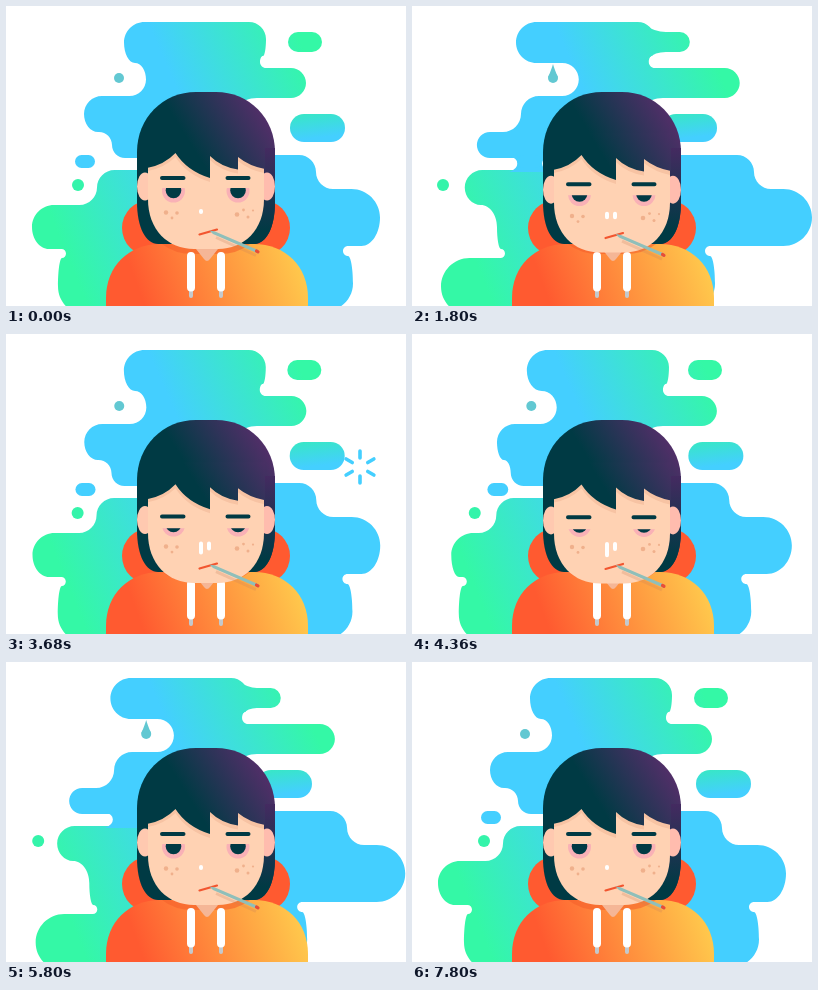
Recreate the animation shown at these times as an HTML page. Size 400 by 300 pixels, loop 7920 ms.

```html
<!DOCTYPE html>
<html lang="en">
<head>
<meta charset="utf-8">
<title>Under the weather</title>
<style>
  html, body { margin: 0; width: 100%; height: 100%; overflow: hidden; background: #fff; }
  svg { display: block; width: 100vw; height: 100vh; }
</style>
</head>
<body>
<svg viewBox="0 0 400 300">
  <defs>
    <linearGradient id="sky" gradientUnits="userSpaceOnUse" x1="150" y1="36" x2="271" y2="-17">
      <stop stop-color="#44cfff"/><stop offset="1" stop-color="#34f8a6"/>
    </linearGradient>
    <linearGradient id="meadow" gradientUnits="userSpaceOnUse" x1="55" y1="235" x2="190" y2="180">
      <stop stop-color="#34f8a6"/><stop offset="1" stop-color="#44cfff"/>
    </linearGradient>
    <linearGradient id="pillTint" x1="0.3" y1="0" x2="0.5" y2="0.85">
      <stop stop-color="#38e6c8"/><stop offset="1" stop-color="#44cfff"/>
    </linearGradient>
    <linearGradient id="hairTint" gradientUnits="userSpaceOnUse" x1="192" y1="150" x2="272" y2="100">
      <stop stop-color="#003a44"/><stop offset="1" stop-color="#632c70"/>
    </linearGradient>
    <linearGradient id="lockTint" gradientUnits="userSpaceOnUse" x1="0" y1="135" x2="0" y2="225">
      <stop stop-color="#4a2963"/><stop offset="1" stop-color="#003a44"/>
    </linearGradient>
    <linearGradient id="cloth" gradientUnits="userSpaceOnUse" x1="135" y1="290" x2="285" y2="235">
      <stop stop-color="#ff5a30"/><stop offset="1" stop-color="#ffc84c"/>
    </linearGradient>
    <clipPath id="openEye"><rect id="lid" x="140" width="120" height="40"/></clipPath>
  </defs>

  <g id="backdrop">
    <path id="right" fill="#44cfff"/>
    <path id="lower" fill="url(#meadow)"/>
    <path id="top" fill="url(#sky)"/>
    <path id="bridge" fill="#44cfff"/>
    <rect id="leftPill" y="149" height="13" rx="6.5" fill="#44cfff"/>
    <path id="greenNeck" fill="url(#meadow)"/>
    <circle id="greenDot" cy="179" r="6" fill="#34f4aa"/>
    <path id="nubNeck" fill="url(#sky)"/>
    <rect id="nub" y="26" width="34" height="20" rx="10" fill="url(#sky)"/>
    <rect id="bluePill" y="108" width="55" height="28" rx="14" fill="url(#pillTint)"/>
    <g fill="#62c8d2"><path id="dropTip"/><circle id="drop" cy="72" r="5"/></g>
    <path id="burst" fill="none" stroke="#44cfff" stroke-width="3.6" stroke-linecap="round"/>
  </g>

  <rect x="116" y="194" width="168" height="56" rx="28" fill="#ff5a30"/>
  <path fill="url(#hairTint)" d="M131 146C131 112 157 86 190 86H210C243 86 269 112 269 146V196C269 222 260 238 248 238H152C140 238 131 222 131 196Z"/>
  <path fill="url(#lockTint)" d="M257 142H269V196C269 222 260 238 248 238H230Z"/>
  <path fill="url(#cloth)" d="M100 300V292C100 260 123 238 154 238H248C279 238 302 260 302 292V300Z"/>
  <path fill="#f6612c" opacity=".6" d="M156 238H244Q232 248 212 248H188Q168 248 156 238Z"/>
  <path fill="#f5b696" d="M190 243H212L204 253Q201 257 198 253Z"/>
  <g stroke-linecap="round">
    <path stroke="#c3c9cd" stroke-width="4" d="M185 284V290M215 284V290"/>
    <path stroke="#fff" stroke-width="8" d="M185 250V281.500M215 250V281.500"/>
  </g>

  <g id="ears">
    <ellipse cx="139" cy="180.500" rx="8" ry="14" fill="#ffc9b0"/>
    <ellipse cx="261" cy="180.500" rx="8" ry="14" fill="#ffbcae"/>
  </g>
  <g id="face">
    <path fill="#ffd2b3" d="M142 130H258V193C258 224 238 243 212 243H188C162 243 142 224 142 193Z"/>
    <g clip-path="url(#openEye)">
      <g fill="#f9b1b6"><circle cx="167.500" cy="185" r="11.500"/><circle cx="232" cy="185" r="11.500"/></g>
      <g fill="#003a44"><circle cx="167.500" cy="184.500" r="7.800"/><circle cx="232" cy="184.500" r="7.800"/></g>
    </g>
    <g fill="#f0b08c">
      <circle cx="160" cy="206.500" r="2.200"/><circle cx="171" cy="207" r="1.800"/><circle cx="166" cy="212" r="1.400"/>
      <circle cx="231" cy="208.500" r="2.300"/><circle cx="237.500" cy="204" r="1.400"/>
      <circle cx="242" cy="211" r="1.500"/><circle cx="247" cy="204.500" r="1.100"/>
    </g>
    <path id="brows" stroke="#003a44" stroke-width="4" stroke-linecap="round" d="M156 172H177.500M221.500 172H242.500"/>
    <path stroke="#f2552f" stroke-width="2.200" stroke-linecap="round" d="M193.500 228.500L211 223.500"/>
    <path stroke="#c9805a" stroke-width="3" opacity=".25" d="M210 231.500L250 249.500"/>
    <path fill="#8fbfba" d="M203.500 224.500L209 225.500L252 244Q254.500 246 252 247.500L207 228Z"/>
    <path stroke="#ea4c35" stroke-width="3.200" stroke-linecap="round" d="M250.500 245L252 245.800"/>
  </g>
  <path id="drips" fill="none" stroke="#fff" stroke-width="4" stroke-linecap="round"/>
  <g id="fringe">
    <path fill="#eeb08e" opacity=".45" transform="translate(0 4)" d="M142 161Q158 158 169.500 147Q181 165 204 172V150Q215 161 232 163.500V151Q243 160 258 163V140H142Z"/>
    <path fill="url(#hairTint)" d="M141 162Q158 159 169.500 147Q181 165 204 172V150Q215 161 232 163.500V151Q243 160 259 163V125H141Z"/>
  </g>
</svg>
<script>
const LOOP = 7920, STEP = 40, LAST = 7800, CYCLE = 3800;
const $ = id => document.getElementById(id);
const set = (id, attrs) => Object.entries(attrs).forEach(([k, v]) => $(id).setAttribute(k, v));
const wave = turns => (1 - Math.cos(turns * 2 * Math.PI)) / 2;
const clamp = (v, lo, hi) => Math.min(hi, Math.max(lo, v));

// Out and back within one cycle, furthest away at `peak`
function swing(ms, peak) {
  return wave(ms < peak ? ms / peak / 2 : 0.5 + (ms - peak) / (CYCLE - peak) / 2);
}

// Closed right-angled outline; small steps become soft S-curves, large ones round ends
function blob(points, radius = 29) {
  const n = points.length;
  return points.map(([x, y], i) => {
    const before = points[(i + n - 1) % n], after = points[(i + 1) % n];
    const [px, qx] = [before[0] - x, after[0] - x], [py, qy] = [before[1] - y, after[1] - y];
    const ry = Math.min(radius, Math.abs(py + qy) / 2);
    const rx = Math.min(ry, Math.abs(px + qx) / 2);
    const at = (dx, dy, k) => `${(x + Math.sign(dx) * rx * k).toFixed(2)} ${(y + Math.sign(dy) * ry * k).toFixed(2)}`;
    return `${i ? 'L' : 'M'}${at(px, py, 1)}C${at(px, py, 0.45)} ${at(qx, qy, 0.45)} ${at(qx, qy, 1)}`;
  }).join('') + 'Z';
}

// Turns rows of [x, yTop, yBottom] into the corners of one side
const side = rows => rows.flatMap(([x, y0, y1]) => [[x, y0], [x, y1]]);

function drawBackdrop(ms) {
  const e = swing(ms, 1780), late = swing(ms, 2080), slow = swing(ms, 2300);

  const shoulder = 260 - 18 * late, shelf = 106 - 43 * late;
  const rightSide = side([
    [shoulder, 16, 50], [shoulder - 6, 50, 62], [300 + 29 * late, 62, 92], [222, 92, 152]
  ]);
  const leftSide = side([
    [118 - 14 * e, 16, 57], [140 + 28 * late, 57, 90], [78 + 31 * e, 90, 126], [shelf, 126, 152]
  ]);
  set('top', { d: blob([...rightSide, ...leftSide.reverse()]) });

  const ledge = 91 - 40 * late, bulge = 26 + 59 * e, base = 52 - 23 * e;
  set('lower', { d: blob([[210, 164], [210, 309], ...side([
    [ledge, 164, 199], [bulge, 199, 243], [Math.max(bulge, base) + 8, 243, 252], [base, 252, 309]
  ]).reverse()]) });

  const foot = 347 - 46 * late;
  set('right', { d: blob([[200, 149],
    ...side([[310 + 32 * e, 149, 183], [374 + 26 * e, 183, 240], [foot - 10, 240, 250], [foot, 250, 305]]),
    [200, 305]]) });

  const l = 69 + 38 * late, r = 89 + 43 * late, flare = Math.min(8, l - shelf);
  set('leftPill', { x: l, width: r - l });
  set('bridge', { d: flare > 0
    ? `M${l - flare} 150Q${l} 152 ${l} 157.500Q${l} 163 ${l - flare} 166H${r + 8}Q${r} 163 ${r} 157.500Q${r} 152 ${r + 8} 150Z`
    : '' });

  const dot = 72 - 41 * e;
  set('greenDot', { cx: dot });
  set('greenNeck', { d: ledge - dot < 17.4
    ? `M${dot} 173Q${dot + 12} 174 ${ledge + 8} 166V195Q${dot + 12} 186 ${dot} 185Z` : '' });

  const nub = 282 - 43 * slow;
  set('nub', { x: nub });
  set('nubNeck', { d: nub - shoulder < 7
    ? `M${shoulder - 12} 18Q${shoulder} 26 ${nub + 10} 26V46Q${shoulder} 46 ${shoulder - 6} 52Z` : '' });

  set('bluePill', { x: 284 - 34 * e });

  const x = 113 + 28 * e, tip = 72 - clamp(5 + (e - 0.35) * 22, 5, 14);
  set('drop', { cx: x });
  set('dropTip', { d: `M${x} ${tip}Q${x + 1} ${tip + 4} ${x + 5} 71.500H${x - 5}Q${x - 1} ${tip + 4} ${x} ${tip}Z` });
}

function drawBurst(ms) {
  const p = (ms - 3560) / 240;
  let d = '';
  if (p > 0 && p < 1) {
    const inner = 2 + 14 * p, outer = 16 * Math.sin(Math.min(1, p * 2) * Math.PI / 2);
    for (let i = 0; i < 6; i++) {
      const a = Math.PI / 2 + i * Math.PI / 3, at = q => `${354 + q * Math.cos(a)} ${133 + q * Math.sin(a)}`;
      d += `M${at(inner)}L${at(Math.max(inner, outer))}`;
    }
  }
  set('burst', { d });
}

// Slowly dozes off, then jerks awake
function drawFace(t) {
  const awake = clamp((t - 5200) / 400, 0, 1);
  const doze = Math.sin(Math.min(1, t / 5000) * Math.PI / 2) * (1 - wave(awake / 2));
  const sink = (id, depth) => set(id, { transform: `translate(0 ${depth * doze})` });
  sink('face', 6.6);
  sink('ears', 6);
  sink('brows', 5);
  sink('fringe', 3.5);
  set('lid', { y: 182 + 6.9 * doze });

  const y = 205 + 5 * doze;
  const run = Math.min(1, t / 5000) ** 1.6 * 13 * (1 - awake);
  const left = `M195 ${y}v${1 + run}`;
  set('drips', { d: run > 0.6 ? `${left}M203 ${y}v${Math.min(5, 1 + run)}` : left });
}

function render(now) {
  const t = Math.min(LAST, Math.floor(now % LOOP / STEP) * STEP);
  const ms = t < 2 * CYCLE ? t % CYCLE : 0;
  drawBackdrop(ms);
  drawBurst(ms);
  drawFace(t);
}

let start;
function tick(now) {
  start ??= now;
  render(now - start);
  requestAnimationFrame(tick);
}
render(0);
requestAnimationFrame(tick);
</script>
</body>
</html>
```
